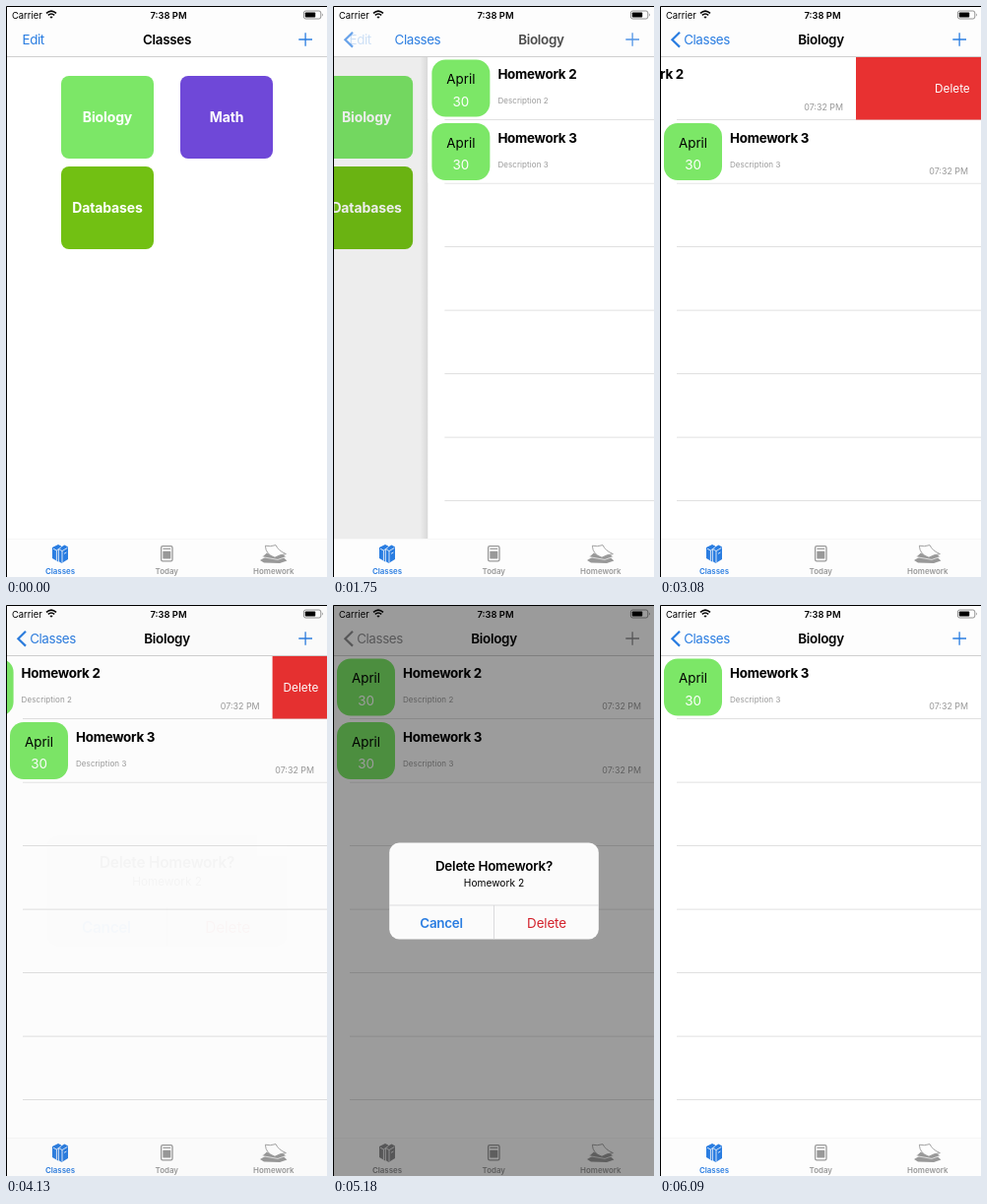
Animation of 326x580 px, one loop 6.44 s. Source, as an HTML page:

```html
<!DOCTYPE html>
<html lang="en">
<head>
<meta charset="utf-8">
<title>Homework planner</title>
<style>
  html, body { margin: 0; width: 100%; height: 100%; overflow: hidden; background: #fff; }
  svg { display: block; width: 100%; height: 100%; --tint: #2a7de1; }
  text { font: 400 13.4px Inter, Roboto, sans-serif; letter-spacing: -.03em; }
  .mid { text-anchor: middle; }
  .end { text-anchor: end; }
  .semi { font-weight: 600; letter-spacing: -.02em; }
  .bold { font-weight: 700; letter-spacing: -.02em; }
  .tile { font-size: 14px; font-weight: 700; letter-spacing: -.01em; fill: #fff; }
  .status { font-size: 9.4px; letter-spacing: 0; }
  .tab { font-size: 7.9px; font-weight: 600; letter-spacing: 0; }
  .note { font-size: 8px; letter-spacing: .01em; fill: #999; }
  .time { font-size: 8.9px; letter-spacing: 0; fill: #999; }
  .plain { letter-spacing: 0; }
  .tint { fill: var(--tint); }
  .line { fill: none; stroke: var(--tint); }
  .grey { fill: #999; }
</style>
</head>
<body>
<svg viewBox="0 0 326 580" preserveAspectRatio="none">
  <defs>
    <linearGradient id="edge">
      <stop offset="0" stop-opacity="0"/>
      <stop offset="1" stop-opacity=".09"/>
    </linearGradient>
  </defs>
  <rect width="326" height="580" fill="#fff"/>

  <g id="classes">
    <g id="tiles"></g>
    <rect id="shade" width="500" height="580"/>
  </g>

  <g id="list">
    <rect x="-8" width="8" height="580" fill="url(#edge)"/>
    <rect width="326" height="580" fill="#fff"/>
    <g id="lines"></g>
    <g id="row2"></g>
    <g id="row3"></g>
    <g id="remove">
      <rect id="red" y="51.5" width="326" height="64" fill="#e83131"/>
      <text id="removeLabel" y="87.5" fill="#fff" style="font-size:11.8px;letter-spacing:0">Delete</text>
    </g>
  </g>

  <rect width="326" height="51" fill="#fdfdfd"/>
  <rect y="51" width="326" height="1" fill="#cfcfcf"/>
  <text class="status" x="6" y="12.6">Carrier</text>
  <g fill="none" stroke="#000" stroke-width="1.5">
    <path d="M41 7.4Q46 2.8 51 7.4M42.8 9.4Q46 6.6 49.2 9.4"/>
    <path d="M46 12.8L44.4 11Q46 9.8 47.6 11Z" fill="#000" stroke="none"/>
  </g>
  <text class="status mid semi" x="165" y="12.6">7:38 PM</text>
  <rect x="302.4" y="5" width="17.4" height="8" rx="2" fill="none" stroke="#777" stroke-width=".8"/>
  <rect x="303.8" y="6.4" width="10.4" height="5.2" rx=".8"/>
  <path d="M321 7.4Q322.6 9 321 10.6Z" fill="#777"/>

  <text id="edit" class="tint" x="16.5" y="39">Edit</text>
  <path id="chevron" class="line" d="M20 26.8L12.4 34.2L20 41.6" stroke-width="2.2"/>
  <text id="oldTitle" class="mid semi" y="39">Classes</text>
  <text id="back" class="mid tint" y="39">Classes</text>
  <text id="newTitle" class="mid semi" y="39">Biology</text>
  <path id="plus" class="line" d="M297.3 34H311M304.1 27.2V40.8" stroke-width="1.3"/>

  <rect y="541" width="326" height="39" fill="#fdfdfd"/>
  <rect y="541" width="326" height=".6" fill="#f3f3f3"/>
  <g class="tint">
    <path d="M47 550L53 547L56 548.4V562L53 564.6L47 561Z"/>
    <path d="M53.5 551L59.5 547.4L63 549.6V562L56.5 566L53.5 564Z"/>
    <g fill="none" stroke="#fdfdfd" stroke-width=".8">
      <path d="M48 551.3L51.4 553V563.6M51.4 553L56 549.8M53.4 552V564.4"/>
      <path d="M54 551.8L57 553.6V565.6M57 553.6L62.4 550.4M59 556.4L61.4 555"/>
    </g>
    <text class="tab mid" x="55" y="577.3">Classes</text>
  </g>
  <g class="grey">
    <rect x="157.6" y="548.6" width="11.4" height="15.2" rx="1.6" fill="none" stroke="#999" stroke-width="1.3"/>
    <path d="M159.4 551.4H167.2" stroke="#999" stroke-width="1.2"/>
    <rect x="159.3" y="553.8" width="8" height="7.6" rx=".6"/>
    <text class="tab mid" x="163.3" y="577.3">Today</text>
  </g>
  <g class="grey">
    <path d="M258 563L264 559.6L281 559.4L285.4 563.4L278 566L262 565.6Z"/>
    <path d="M260 559.6L264.5 555.6L281 556.6L284.6 559.4L276 562.4Z" stroke="#fdfdfd" stroke-width=".7"/>
    <path d="M263.4 548.2Q268 549.6 274 547.6Q276.6 553.4 284.4 556.6Q277.6 557.4 273 560.2Q263.6 557 263.4 548.2Z" fill="#fdfdfd" stroke="#999" stroke-width=".9"/>
    <text class="tab mid" x="271.8" y="577.3">Homework</text>
  </g>

  <rect id="dim" width="326" height="580"/>
  <g id="alert">
    <rect x="57.2" y="241.5" width="212.6" height="98" rx="10" fill="#fbfbfb"/>
    <path d="M57.2 305H269.8M163.5 305V339.5" stroke="#d4d4d6" stroke-width=".8"/>
    <text class="mid semi" x="163.5" y="269.8" style="letter-spacing:-.015em">Delete Homework?</text>
    <text class="mid plain" x="163.5" y="285.6" style="font-size:10.2px">Homework 2</text>
    <text class="mid semi" x="110" y="327.6" fill="#2a7de1">Cancel</text>
    <text class="mid" x="217" y="327.6" fill="#d3222c" style="letter-spacing:-.01em">Delete</text>
  </g>
  <path d="M.5 580V.5H326" fill="none" stroke="#000"/>
</svg>

<script>
const LOOP = 6440, W = 326, ROW = 64.5, TOP = 51;
const $ = id => document.getElementById(id);
const lerp = (a, b, p) => a + (b - a) * p;
const clamp = p => Math.min(1, Math.max(0, p));
const ease = p => (1 - Math.cos(Math.PI * clamp(p))) / 2;

// Critically damped spring from 0 to 1; start in ms, rate per second.
function spring(t, start, rate) {
  const x = Math.max(0, t - start) / 1000 * rate;
  return 1 - (1 + x) * Math.exp(-x);
}

const set = (id, attrs) => {
  for (const k in attrs) $(id).setAttribute(k, attrs[k]);
};
const move = (id, x, y = 0) => set(id, { transform: `translate(${x} ${y})` });

const tile = (name, x, y, color) =>
  `<rect x="${x}" y="${y}" width="94" height="84" rx="8" fill="${color}"/>
   <text class="tile mid" x="${x + 47}" y="${y + 47.2}">${name}</text>`;

const row = n =>
  `<rect y="${TOP + 1}" width="326" height="63" fill="#fff"/>
   <rect x="4" y="54.5" width="59" height="58" rx="14" fill="#7ce767"/>
   <text class="mid plain" x="33.5" y="79.4">April</text>
   <text class="mid plain" x="33.5" y="101.6" fill="#fff">30</text>
   <text class="bold" x="71" y="74.4">Homework ${n}</text>
   <text class="note" x="71" y="99.4">Description ${n}</text>
   <text class="time end" x="313" y="106.3">07:32 PM</text>`;

$('tiles').innerHTML = tile('Biology', 56, 71, '#7ce767') +
  tile('Math', 177, 71, '#6f48d8') + tile('Databases', 56, 163, '#72c013');
$('row2').innerHTML = row(2);
$('row3').innerHTML = row(3);
for (let i = 1; i < 10; i++)
  $('lines').innerHTML += `<rect x="17" y="${TOP - .3 + i * ROW}" width="309" height=".8" fill="#d9d9d9"/>`;

function swipe(t) {
  if (t < 3200) return 134 * ease((t - 2680) / 470);
  if (t < 4120) return lerp(134, 56, spring(t, 3200, 14));
  return 56 * (1 - spring(t, 4120, 14));
}

function drawPush(t) {
  const p = t > 2300 ? 1 : spring(t, 1500, 9.8);
  move('classes', -.3 * W * p);
  set('shade', { 'fill-opacity': .1 * p });
  move('list', W * (1 - p));
  $('list').style.display = p ? '' : 'none';
  set('edit', { opacity: clamp(1 - p * 1.1) });
  set('chevron', { opacity: p });
  set('oldTitle', { x: lerp(163.5, 47.5, p), opacity: clamp(1 - p * 1.6) });
  set('back', { x: lerp(177.5, 47.5, p), opacity: clamp(p * 1.4) });
  set('newTitle', { x: lerp(325.5, 163.5, p), opacity: p });
  set('plus', { opacity: 1 - .9 * p * (1 - p) });
}

function drawRows(t) {
  const shift = swipe(t);
  const gone = ease((t - 5670) / 300);
  move('row2', -shift);
  set('row2', { opacity: 1 - gone });
  move('row3', 0, ROW * (1 - gone));
  move('lines', 0, gone < 1 ? -ROW * gone : 0);
  $('remove').style.display = shift > .2 ? '' : 'none';
  set('red', { x: W - shift });
  set('removeLabel', { x: W - Math.min(shift, 56) + 11 - Math.max(0, shift - 56) * .028 });
}

function drawAlert(t) {
  const show = t < 5270 ? spring(t, 4122, 29) : 1 - spring(t, 5270, 16);
  const scale = 1.2 - .2 * spring(t, 4090, 23);
  set('dim', { 'fill-opacity': .39 * show });
  set('alert', {
    opacity: show,
    transform: `translate(163.5 290.5) scale(${scale}) translate(-163.5 -290.5)`
  });
  const tint = [42, 125, 225].map((c, i) => Math.round(lerp(c, [142, 142, 144][i], show)));
  document.querySelector('svg').style.setProperty('--tint', `rgb(${tint})`);
}

function draw(t) {
  drawPush(t);
  drawRows(t);
  drawAlert(t);
}

const start = performance.now();
function tick() {
  draw((performance.now() - start) % LOOP);
  requestAnimationFrame(tick);
}
tick();
</script>
</body>
</html>
```
